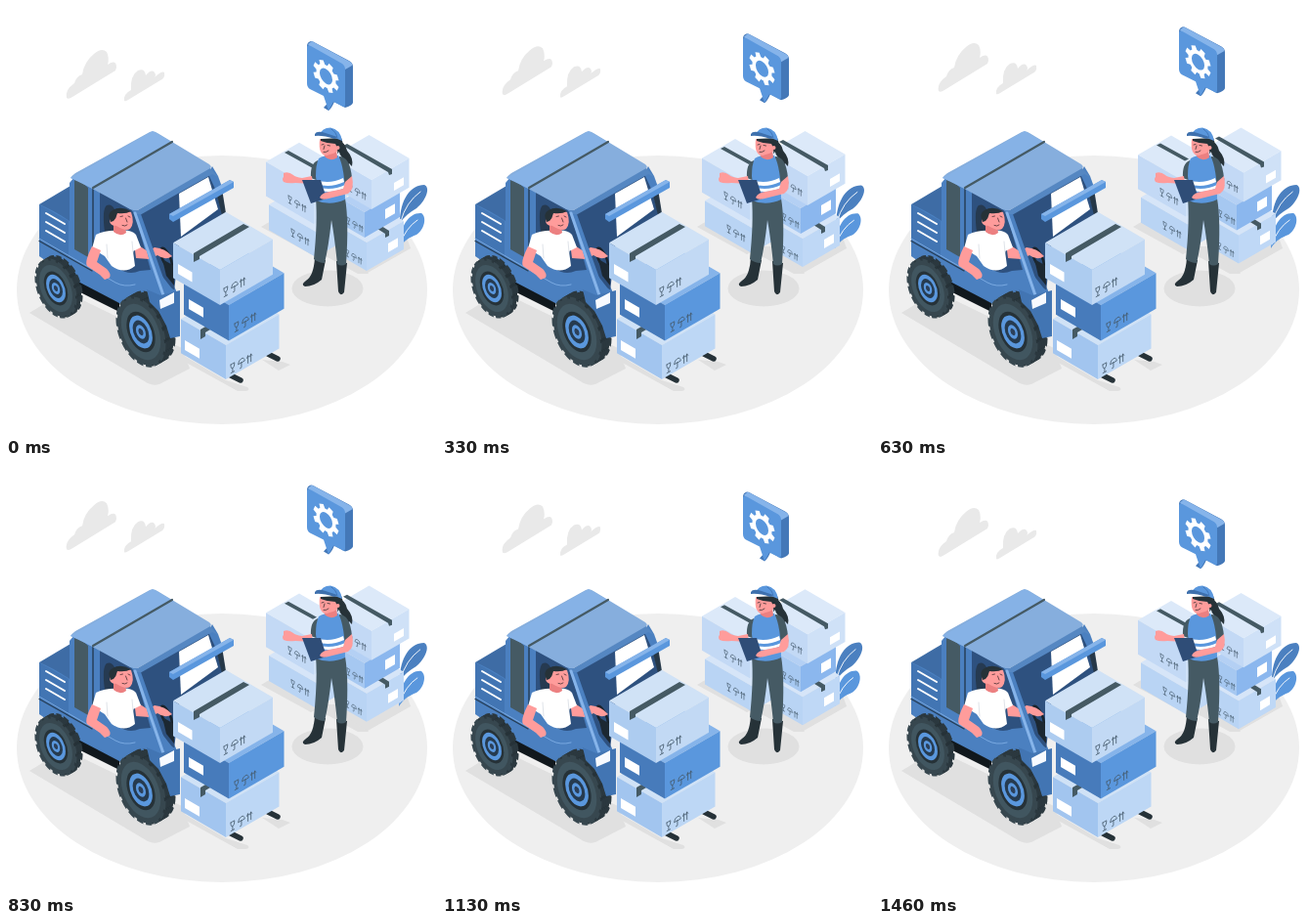
An HTML page that plays this animation: 440x440 px, repeating every 1.5 s.

```html
<!DOCTYPE html>
<html lang="en">
<head>
<meta charset="utf-8">
<title>Warehouse loading</title>
<style>
html, body { margin: 0; width: 100%; height: 100%; overflow: hidden; background: #fff; }
svg { display: block; width: 100vw; height: 100vh; }
.line { fill: none; stroke-linecap: round; stroke-linejoin: round; }
</style>
</head>
<body>
<svg id="stage" viewBox="0 0 440 440">
  <defs>
    <g id="care" class="line" stroke="#455a6c" stroke-width=".8">
      <path d="M0 0h4.6q.2 5-2.3 5T0 0M2.3 5v4M.2 9.2h4.2"/>
      <path d="M9.2 4q.5-4 4-4t4 4zM13.2 4v5q0 1.5-1.7.8"/>
      <path d="M21.300 9V1m-1.300 2l1.300-2 1.300 2M25 9V1m-1.300 2l1.300-2 1.300 2"/>
    </g>
  </defs>
  <ellipse cx="221" cy="290.500" rx="210" ry="137.500" fill="#efefef"/>

  <g id="clouds" fill="#e9e9e9">
    <path d="M62 94Q60 86 70 79Q72 72 78 70Q80 57 90 49Q98 42 103 47Q106 53 104 60Q113 54 113 63L112 66L68 93Q64 96 62 94Z"/>
    <path d="M121 97Q120 90 128 86Q127 71 135 66Q142 63 143 71Q149 64 152 68Q154 71 152 73Q160 66 162 68Q163 74 158 76L125 96Q122 98 121 97Z"/>
  </g>

  <g fill="#e0e0e0">
    <path d="M261 226L271 220L316 246L350 246L371 274L360 274L318 251L312 254Z"/>
    <path d="M345 258L409 234L414 248L370 273Z"/>
    <ellipse cx="329" cy="289" rx="36.500" ry="18.500"/>
    <path d="M24 314L60 292L180 350L188 371L157 387Q151 389 145 386Z"/>
    <path d="M179 356L225 383L247 390Q251 393 245 394L237 394L181 363ZM262 362L283 364L291 367L279 373Z"/>
  </g>

  <g id="plant">
    <path d="M403 222C403 198 414 183 428 183C435 186 429 200 420 207C413 211 407 216 403 222Z" fill="#4b80c0"/>
    <path d="M402 248C403 224 413 211 425 212C431 216 428 229 420 234C413 237 408 239 402 248Z" fill="#5a97dd"/>
    <path class="line" d="M404 220Q409 201 424 190M403 244Q409 227 421 219" stroke="#fff" stroke-width=".9"/>
  </g>

  <g id="stock"></g>

  <g id="worker">
    <path d="M340 138Q347 139 349 148Q356 156 354 164L351 161L348 166Q349 159 344 155Q339 150 340 138Z" fill="#263238"/>
    <path d="M316 257L327 260L323 280Q315 287 306 287Q301 285 307 281Q315 276 316 257ZM338 261L349 263L346 293Q342 298 340 292Z" fill="#263238"/>
    <path d="M317 197L347 197Q351 220 348 264Q343 267 339 264Q336 235 333 219Q330 247 326 263Q320 263 315 259Q319 221 317 197Z" fill="#455a64"/>
    <path d="M319 158Q311 161 312 176L320 179L323 158ZM341 154Q352 154 354 176L346 182L338 173Z" fill="#455a64"/>
    <path d="M320 156Q327 151 340 153Q347 166 347 198Q332 205 317 199Q319 187 317 174Q317 162 320 156Z" fill="#5a97dd"/>
    <path d="M317 178Q331 183 345 176L346 180Q331 187 318 182ZM317 185Q333 190 347 183V186Q332 193 317 188Z" fill="#fff"/>
    <path d="M327 148L338 147L339 155Q332 160 326 154Z" fill="#ec8081"/>
    <path d="M321 136Q320 145 322 149Q325 155 331 152Q339 150 342 146L342 136Z" fill="#ff9c9b"/>
    <path d="M322 136L343 135Q347 144 342 148L339 151Q340 146 337 141Q329 141 322 138Z" fill="#263238"/>
    <circle cx="339.500" cy="145" r="2" fill="#ff9c9b"/>
    <path class="line" d="M323 142L325 141.500M329 142.500L331.500 143M325 149.500Q328 150 330 148M326 143L325 146.500" stroke="#3a3034" stroke-width=".8"/>
    <path d="M321 132Q323 124.500 332 124.500Q342 126 344 138Q333 133 321 132Z" fill="#5a97dd"/>
    <path d="M316 131Q318 127 327 130L339 134L336 136Q324 132 316 133Z" fill="#3e70ad"/>
    <path class="line" d="M333 126Q338 129 339 135" stroke="#4177ba" stroke-width="1"/>
    <path d="M313 174L303 176Q296 175 294 173Q289 169 284 171L284 175Q282 177 284 180Q288 182 296 181L314 182Z" fill="#ff9c9b"/>
    <path d="M303 178L322 178L328 197L312 202Z" fill="#2f4d77"/>
    <path d="M347 180L354 174Q357 188 350 192L330 197Q323 199 321 196Q323 191 331 190L345 187Z" fill="#ff9c9b"/>
  </g>

  <g id="truck">
    <path d="M34 203L66 184L90 195L64 221Z" fill="#3e6ca5"/>
    <path d="M34 203Q49 209 65 220V181L70 175L133 209L174 291L177 312L162 325L113 303L70 281L34 256Z" fill="#4b80c0"/>
    <path d="M34 203L64 220V257L34 240Z" fill="#4275b3"/>
    <path d="M72 281L116 304V313L72 291Z" fill="#11181d"/>
    <path class="line" d="M41 212L60 223M41 221L60 232M41 230L60 241" stroke="#fff" stroke-width="2"/>
    <path class="line" d="M34 238L112 283Q121 288 132 285" stroke="#86b4ea" stroke-width=".8"/>
    <path class="line" d="M34 240.500L88 271" stroke="#263d55" stroke-width="1.200"/>
    <path d="M70 178Q77 179 84 186V257L70 249Z" fill="#455a64"/>
    <path d="M134 211L209 168L222 214L178 240L172 292L151 265Z" fill="#2e517f"/>
    <path d="M177 192L207 175L217 208L179 236Z" fill="#fff"/>
    <path d="M207 172L211 164L217 174L222 188L216 191Z" fill="#4b80c0"/>
    <path d="M215 190L221 187L225 212L221 214Z" fill="#263848"/>
    <path d="M96 190L131 210L148 270L137 271Q126 276 116 269L96 251Z" fill="#2e517f"/>
    <path class="line" d="M89 187V269" stroke="#29435f" stroke-width="1.600"/>
    <path d="M66 176Q67 174 71 171L147 129Q151 127 155 130L208 162Q212 165 207 168L138 207Q133 211 127 208L70 177Z" fill="#86aedd"/>
    <path d="M66 176L150 128L171 140L89 187Z" fill="#86b2e6"/>
    <path class="line" d="M170 139L89 186" stroke="#455a64" stroke-width="2.200"/>
    <path d="M128 208Q133 211 138 207L209 166L217 175L211 172L137 214L132 214Z" fill="#5587c2"/>
    <path d="M167 213L229 178L233 180V186L171 221L167 218Z" fill="#5a97dd"/>
    <path d="M167 213L229 178L233 180L171 215Z" fill="#86b4ea"/>
    <ellipse cx="164" cy="258" rx="4" ry="11" transform="rotate(-24 164 258)" fill="none" stroke="#18222b" stroke-width="2.500"/>
    <path d="M160 259L172 266V286L164 276Z" fill="#1c2832"/>
  </g>

  <g id="driver">
    <path d="M101 231Q98 208 103 204Q108 202 111 208L113 231Z" fill="#263a51"/>
    <path d="M131 242L145 251L152 247Q163 248 170 256Q163 261 155 255L147 259L133 258Z" fill="#ff9c9b"/>
    <path d="M92 234Q103 229 115 230Q128 228 133 234L138 247L130 251L132 266Q121 275 108 266L101 256L88 248Z" fill="#fff"/>
    <path class="line" d="M103 244L104 258M129 241L130 252" stroke="#dfe3e9" stroke-width="1"/>
    <path d="M88 246L97 250L93 262L103 269Q108 274 106 278L101 280L96 275L83 266Q80 262 88 246Z" fill="#ff9c9b"/>
    <path d="M110 224L122 226L123 232Q117 237 110 231Z" fill="#ec8081"/>
    <path d="M109 212Q116 206 128 211Q132 222 127 228Q123 231 113 225Q106 225 106 219Z" fill="#ff9c9b"/>
    <path d="M107 221Q103 212 109 209Q117 204 128 210Q123 213 114 212Q113 217 110 220Z" fill="#263238"/>
    <path class="line" d="M117 215.500L119.500 215M125 215L127 216M122.500 217L124 221M119 224.500Q122 226 124 224" stroke="#4a3035" stroke-width=".8"/>
  </g>
  <path d="M133 213L138 213L163 284L174 292L158 299Z" fill="#4b80c0"/>
  <path class="line" d="M132 212L161 296" stroke="#86b4ea" stroke-width="3"/>

  <g id="wheels"></g>
  <path d="M144 290L158 296L178 291V338L168 340L164 327L156 312L147 303Z" fill="#4275b3"/>
  <path d="M157 301L172 293V304L158 310Z" fill="#f7faff"/>
  <path class="line" d="M230 378L240 383M268 356L278 361" stroke="#263238" stroke-width="5.500"/>
  <g id="load"></g>

  <g id="bubble">
    <path d="M308 41Q308 37 312 36Q314 36 317 38L351 56Q355 58 355 62V99Q354 102 347 104L336 98Q333 105 330 107L325 104L333 95L309 82Z" fill="#4478b8"/>
    <path d="M309 39L313 36L352 57Q355 59 354 61L347 65L311 42Z" fill="#86b4ea"/>
    <path d="M308 42Q308 39 312 41L344 59Q347 61 347 65V101Q347 105 343 102L335 98L330 107L325 92L311 85Q308 83 308 79Z" fill="#5a97dd"/>
    <path id="gear" transform="matrix(.87 .5 0 1 327.500 72)" fill="#fff" fill-rule="evenodd"/>
  </g>
</svg>
<script>
const $ = id => document.getElementById(id);
const poly = (pts, fill) => `<polygon points="${pts}" fill="${fill}"/>`;
const care = (x, y, side, size) => `<use href="#care" transform="matrix(${.87 * size} ${.5 * side * size} 0 ${size} ${x} ${y})"/>`;

// Blank sticker on an isometric face
const sticker = (x, y, w, side, h = 10) => {
  const d = w * .58 * side;
  return poly(`${x},${y} ${x + w},${y + d} ${x + w},${y + d + h} ${x},${y + h}`, '#fff');
};

// Box from its front top corner: l, r are face widths, h the height
function box(x, y, l, r, h, [top, left, right]) {
  const a = l * .58, b = r * .58;
  return poly(`${x},${y} ${x - l},${y - a} ${x - l + r},${y - a - b} ${x + r},${y - b}`, top) +
    poly(`${x},${y} ${x - l},${y - a} ${x - l},${y - a + h} ${x},${y + h}`, left) +
    poly(`${x},${y} ${x + r},${y - b} ${x + r},${y - b + h} ${x},${y + h}`, right);
}

const pale = ['#dce9f9', '#c3d9f5', '#cfe1f7'];
const soft = ['#d6e5f8', '#b9d4f4', '#bfd8f6'];
const mid = ['#b4d0f4', '#a6c8f1', '#8bb7ee'];
const front = ['#d0e2f6', '#adccf0', '#c2d9f4'];
const blue = ['#86b4ea', '#477bbb', '#5a97dd'];
const base = ['#d0e2f6', '#a2c5ef', '#bdd7f5'];
const tape = '#455a64';

$('stock').innerHTML =
  box(317, 231, 48, 32, 26, soft) + care(292, 228, 1, .78) +
  box(315, 188, 49, 34, 35, pale) +
  poly('285,150 289,148 318,164 314,166', tape) + care(289, 194, 1, .78) +
  box(369, 242, 23, 38, 29, soft) +
  poly('380,228 384,225 392,230 392,235 388,237 388,233', tape) +
  sticker(391, 243, 10, -1, 9) + care(348, 249, 1, .7) +
  box(367, 211, 22, 36, 26, mid) + sticker(388, 208, 10, -1) + care(349, 216, 1, .7) +
  box(374, 178, 41, 38.5, 30, pale) +
  poly('345,143 349,141 395,167 395,172 392,173 391,170', tape) +
  sticker(397, 181, 10, -1, 8) + care(351, 182, 1, .75);

$('load').innerHTML =
  box(225, 347, 46, 54.5, 35, base) +
  poly('199,331 211,324 216,327 204,334 204,338 199,341', tape) +
  sticker(183, 342, 15, 1) + care(230, 367, -1, .95) +
  box(228, 306, 46, 56.5, 36.5, blue) +
  sticker(187, 300, 15, 1) + care(234, 325, -1, .95) +
  box(219, 270, 48, 54, 36, front) +
  poly('243,223 249,226 198,256 198,259 192,262 192,253', tape) +
  sticker(176, 264, 14.5, 1) + care(223, 289, -1, .95);

function wheel(x, y, r, depth) {
  const disc = (k, fill, extra = '') => `<circle r="${r * k}" fill="${fill}" ${extra}/>`;
  const pitch = 2 * Math.PI * r / 18;
  const teeth = c => `stroke="${c}" stroke-width="3.5" stroke-dasharray="${pitch * .7} ${pitch * .3}"`;
  const at = (dx, body) => `<g transform="matrix(.83 .42 0 1.1 ${x + dx} ${y - dx * .58})">${body}</g>`;
  let out = '';
  for (let i = depth; i > 0; i -= 2) out += at(i, disc(.95, '#263238', teeth('#2b383f')));
  return out + at(0, disc(.95, '#37474f', teeth('#37474f')) + disc(.8, '#415660') + disc(.58, '#263238') +
    disc(.47, '#5a97dd') + disc(.33, '#263b50') + disc(.2, '#5a97dd') + disc(.1, '#2c405a'));
}
$('wheels').innerHTML = wheel(51, 289, 25.5, 6) + wheel(138, 333.5, 30.5, 10);

// Eight-toothed cog with a round hole
let cog = '';
for (let i = 0; i < 8; i++) {
  for (const [a, r] of [[-.27, 11.5], [-.17, 15.3], [.17, 15.3], [.27, 11.5]]) {
    const q = i * Math.PI / 4 + a + .4;
    cog += (cog ? 'L' : 'M') + (r * Math.cos(q)).toFixed(2) + ' ' + (r * Math.sin(q)).toFixed(2);
  }
}
$('gear').setAttribute('d', cog + 'ZM-7.5 0a7.500 7.500 0 1 0 15 0a7.500 7.500 0 1 0-15 0Z');

const LOOP = 1500;
const tri = p => 1 - Math.abs(1 - 2 * (p % 1));

function draw(ms) {
  const p = (ms % LOOP + 25) / LOOP;
  const lift = tri(p);
  const move = (id, dist) => $(id).setAttribute('transform', `translate(0 ${(dist * (.033 - lift)).toFixed(3)})`);
  move('bubble', 17.6);
  move('stock', 8.8);
  move('clouds', 8.3);
  const sway = 2 * tri(p + .25) - 1;
  $('plant').setAttribute('transform', `rotate(${sway.toFixed(3)} 403 245)`);
}

const start = performance.now();
function tick() {
  draw(performance.now() - start);
  requestAnimationFrame(tick);
}
tick();
</script>
</body>
</html>
```
